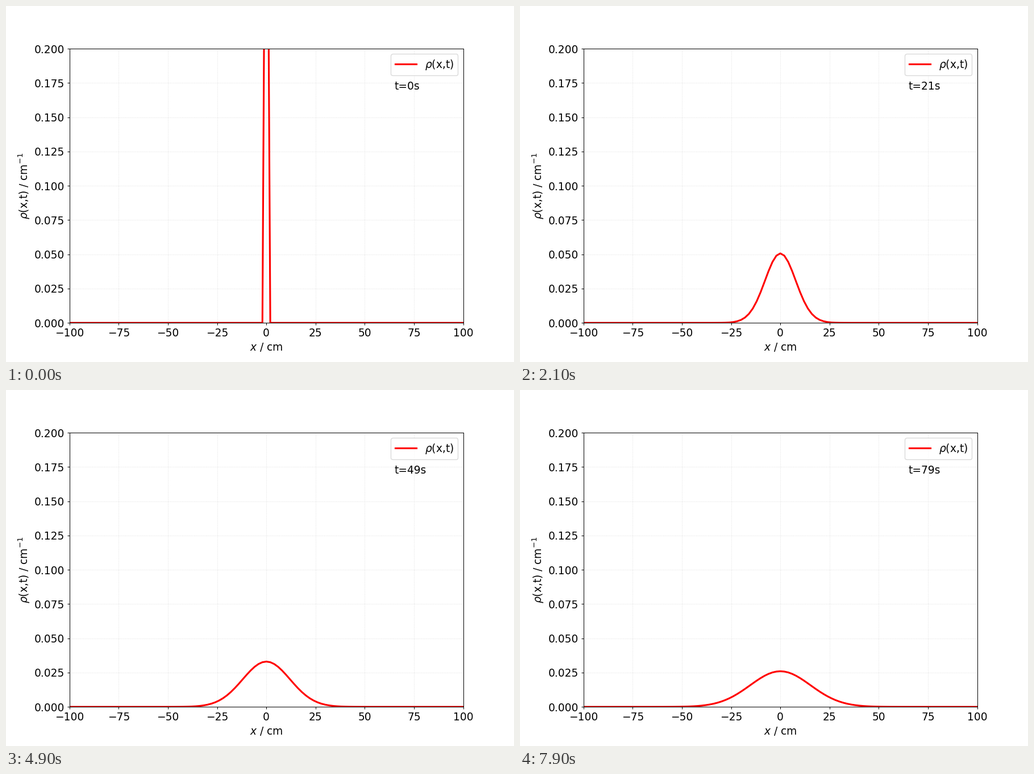
Write a matplotlib script that moves like this. It is 894 by 626 pixels and loops after 8 s.

```python
import numpy as np
import matplotlib.pyplot as plt
from matplotlib.animation import FuncAnimation

WIDTH, HEIGHT, DPI = 894, 626, 89.4
FRAMES, INTERVAL = 80, 100
DX, DIFFUSION = 2.0, 1.5

plt.rcParams.update({"font.family": "DejaVu Sans", "font.size": 15})

x = np.linspace(-100, 100, 101)
cells = np.rint(x / DX)
k = 2 * np.pi * np.arange(512) / 512
modes = np.cos(np.outer(cells, k))


def density(t):
    """Diffusion of a unit pulse on a lattice with spacing DX."""
    decay = np.exp(-2 * DIFFUSION / DX**2 * t * (1 - np.cos(k)))
    return modes @ decay / k.size / DX


fig, ax = plt.subplots(figsize=(WIDTH / DPI, HEIGHT / DPI), dpi=DPI)
line, = ax.plot(x, density(0), color="red", lw=2.5, label=r"$\rho$(x,t)")
clock = ax.text(65, 0.17, "t=0s")

ax.set_xlim(-100, 100)
ax.set_ylim(0, 0.2)
ax.set_xlabel("$x$ / cm")
ax.set_ylabel(r"$\rho$(x,t) / cm$^{-1}$")
ax.grid(ls=":", alpha=0.4)
ax.legend(loc="upper right")


def update(t):
    line.set_ydata(density(t))
    clock.set_text(f"t={t}s")
    return line, clock


anim = FuncAnimation(fig, update, frames=FRAMES, interval=INTERVAL,
                     repeat=True, repeat_delay=0)
plt.show()
```
